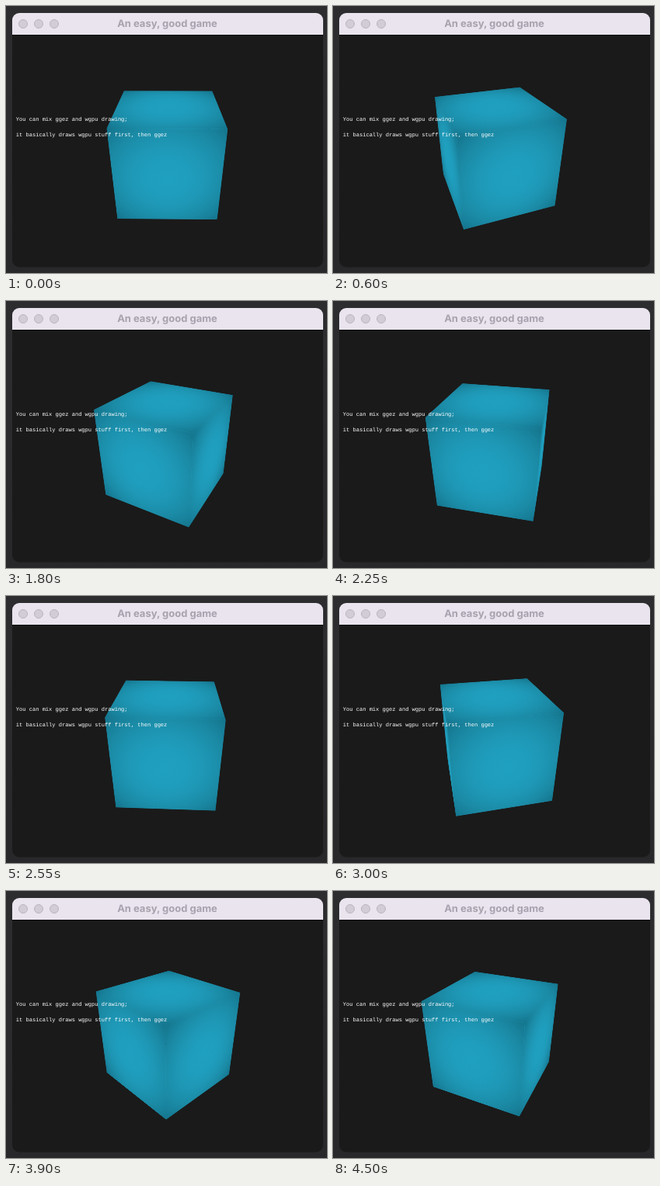
Recreate the animation shown at these times as an HTML page. Size 413 px wide and 344 px high, loop 4520 ms.

```html
<!DOCTYPE html>
<html lang="en">
<head>
<meta charset="utf-8">
<title>An easy, good game</title>
<style>
  html, body { margin: 0; width: 100%; height: 100%; overflow: hidden; background: #2b2b2d; }
  svg { position: absolute; left: 0; top: 0; }
  text { text-rendering: geometricPrecision; }
  .title { font: 700 13px Inter, sans-serif; fill: #a8a2ae; text-anchor: middle; }
  .note { font: 7.06px "Liberation Mono", monospace; fill: #fff; white-space: pre; }

  /* 45 degree lens over a 300px high view; one cube unit is 100px */
  .view {
    position: absolute; left: 208px; top: 187px; width: 0; height: 0;
    perspective: 362.13px; perspective-origin: 0 0;
  }
  .camera, .cube { position: absolute; width: 0; height: 0; transform-style: preserve-3d; }
  .camera { transform: translateZ(-239.95px) rotateX(-29.89deg); }
  .cube { animation: spin 4520ms infinite; }
  .cube i {
    position: absolute; left: -100px; top: -100px; width: 200px; height: 200px;
    transform: rotateY(var(--y, 0deg)) rotateX(var(--x, 0deg)) translateZ(100px);
    background: radial-gradient(circle 141.42px,
      rgb(32 160 192), rgb(31 158 189) 25%, rgb(31 155 186) 37.5%,
      rgb(30 151 181) 50%, rgb(28 145 174) 62.5%, rgb(27 138 165) 75%,
      rgb(24 128 154) 87.5%, rgb(20 116 140));
  }

  /* 30 jumps of 150ms, then a 20ms hold */
  @keyframes spin {
    0% { transform: rotateY(-0.55deg); animation-timing-function: steps(30, end); }
    99.557%, 100% { transform: rotateY(154.4deg); }
  }
</style>
</head>
<body>
<svg width="413" height="344" viewBox="0 0 413 344">
  <defs>
    <linearGradient id="desk" x2="0" y2="1">
      <stop stop-color="#2d2d2f"/>
      <stop offset="1" stop-color="#28272a"/>
    </linearGradient>
    <clipPath id="frame"><rect x="8" y="9" width="400" height="327.5" rx="9"/></clipPath>
  </defs>
  <rect width="413" height="344" fill="url(#desk)"/>
  <g clip-path="url(#frame)">
    <rect x="8" y="9" width="400" height="328" fill="#1a1a1a"/>
    <rect x="8" y="9" width="400" height="28" fill="#e9e4ee"/>
    <rect x="8" y="37" width="400" height="1" fill="#0c0c0c"/>
  </g>
  <g fill="#d1ccd6" stroke="#bab5bf">
    <circle cx="22" cy="23" r="5.5"/>
    <circle cx="42" cy="23" r="5.5"/>
    <circle cx="62" cy="23" r="5.5"/>
  </g>
  <text class="title" x="207.5" y="27">An easy, good game</text>
</svg>

<div class="view"><div class="camera"><div class="cube">
  <i></i>
  <i style="--y: 90deg"></i>
  <i style="--y: 180deg"></i>
  <i style="--y: 270deg"></i>
  <i style="--x: 90deg"></i>
  <i style="--x: -90deg"></i>
</div></div></div>

<svg width="413" height="344" viewBox="0 0 413 344">
  <text class="note" x="12.8" y="148">You can mix ggez and wgpu drawing;</text>
  <text class="note" x="12.8" y="168">it basically draws wgpu stuff first, then ggez</text>
</svg>
</body>
</html>
```
